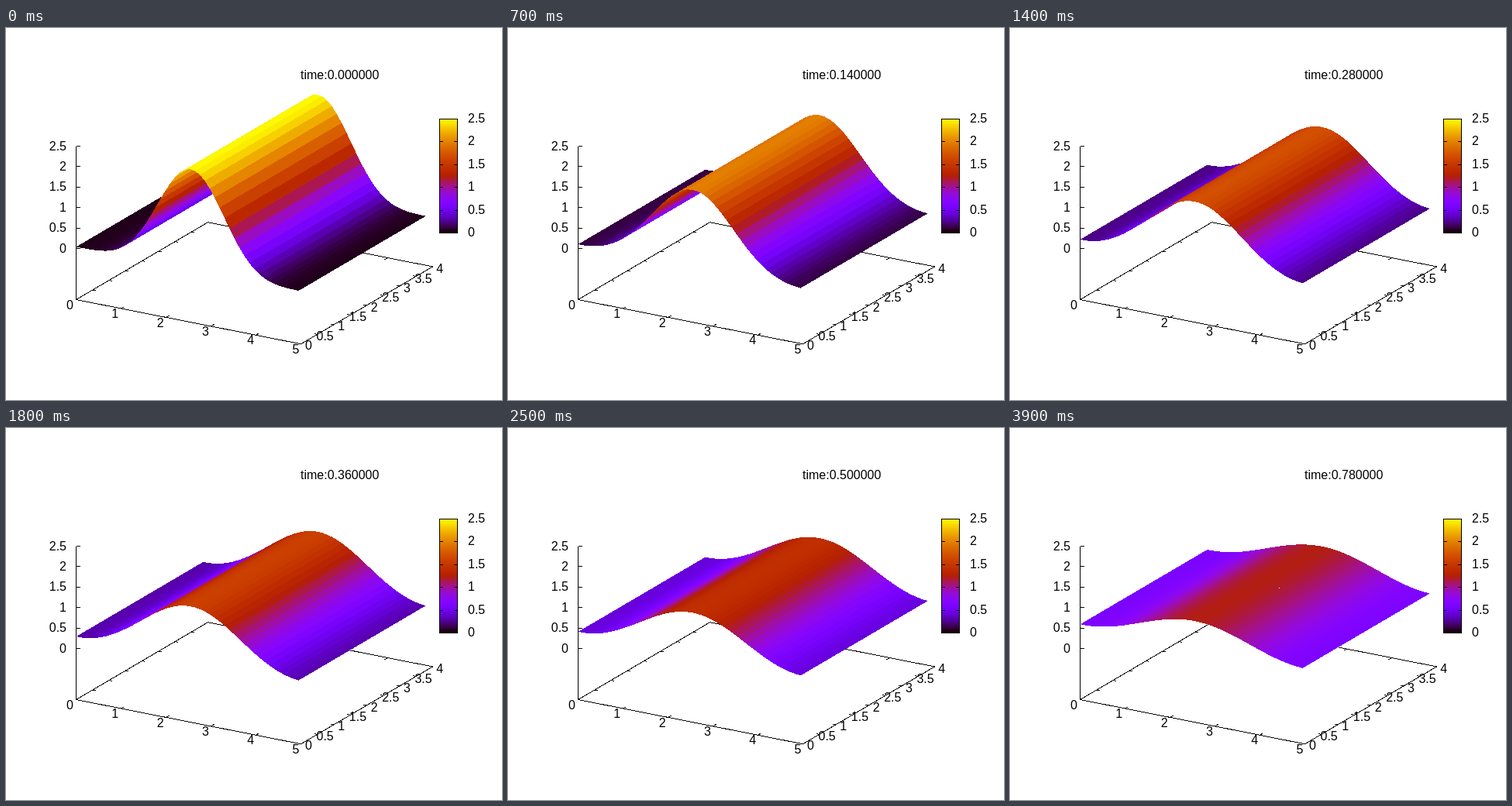
An HTML page for the animation above (4000 ms loop, 640x480 px).

```html
<!DOCTYPE html>
<html>
<head>
<meta charset="utf-8">
<title>Diffusing wave surface</title>
<style>
html, body { margin: 0; width: 100%; height: 100%; overflow: hidden; background: #fff; }
svg { display: block; }
text { font: 16px "Liberation Sans", Arial, sans-serif; fill: #000; }
line, path, rect, polygon { shape-rendering: crispEdges; }
line, path { stroke: #000; fill: none; }
</style>
</head>
<body>
<svg id="stage" width="640" height="480" viewBox="0 0 640 480">
  <g id="axes"></g>
  <g id="surface"></g>
  <g id="bar"></g>
  <text id="clock" x="380" y="66"></text>
</svg>
<script>
const NS = "http://www.w3.org/2000/svg";
const $ = id => document.getElementById(id);
const axes = $("axes"), surface = $("surface"), bar = $("bar"), clock = $("clock");

const STEP_MS = 100, STEPS = 40, DT = 0.02;
const DX = 0.11, STRIPS = 45, DEPTH = 3.86;
const Z_MAX = 2.5, Z_FLOOR = -1.25;

function add(parent, tag, attrs, text) {
  const el = document.createElementNS(NS, tag);
  for (const k in attrs) el.setAttribute(k, attrs[k]);
  if (text !== undefined) el.textContent = text;
  parent.appendChild(el);
  return el;
}

const line = (parent, x1, y1, x2, y2) => add(parent, "line", { x1, y1, x2, y2 });

const label = (parent, x, y, text, anchor) =>
  add(parent, "text", { x, y, "text-anchor": anchor }, text);

const project = (x, y, z) => [
  90.5 + 58 * x + 42.5 * y,
  284.5 + 11.45 * x - 24.95 * y - 52.8 * z
];

// Square root, cubic and sine ramps for the three channels
function color(z) {
  const v = Math.min(1, Math.max(0, z / Z_MAX));
  const rgb = [Math.sqrt(v), v ** 3, Math.max(0, Math.sin(2 * Math.PI * v))];
  return `rgb(${rgb.map(c => Math.round(255 * c))})`;
}

// Heat equation between insulated walls: each cosine mode decays on its own
const MODES = [0.905, 1.19, 0.36, 0.035];
function height(x, t) {
  const a = 2 * Math.PI / 5 * (x - 2.55);
  return MODES.reduce((sum, c, k) =>
    sum + c * Math.exp(-1.7 * k * k * t) * Math.cos(k * a), 0);
}

function drawAxes() {
  const floor = (x, y) => project(x, y, Z_FLOOR);
  const corners = [floor(0, 0), floor(5, 0), floor(5, 4), floor(0, 4)];
  add(axes, "path", { d: "M" + corners.join("L") + "Z" });
  line(axes, 90.5, 350.5, 90.5, 152.5);

  const tick = ([x, y], dx, dy) => line(axes, x, y, x + dx, y + dy);
  for (let i = 0; i <= 5; i++) {
    tick(floor(i, 0), 4, -2.4);
    tick(floor(i, 4), -4, 2.4);
    label(axes, 82.5 + 58.3 * i, 363 + 11.3 * i, i, "middle");

    const [zx, zy] = project(0, 0, i / 2);
    line(axes, zx, zy, zx + 5, zy);
    label(axes, 78, zy + 5, i / 2, "end");
  }
  for (let i = 0; i <= 8; i++) {
    tick(floor(0, i / 2), 4, 0.8);
    tick(floor(5, i / 2), -4, -0.8);
    label(axes, 390.5 + 21.15 * i, 415 - 12.35 * i, i / 2, "middle");
  }
}

function drawBar() {
  const left = 559, top = 117, w = 23, h = 147;
  for (let i = 0; i < h; i++) {
    add(bar, "rect", {
      x: left, y: top + i, width: w, height: 1,
      fill: color(Z_MAX * (1 - i / (h - 1)))
    });
  }
  add(bar, "path", { d: `M${left + 0.5} ${top + 0.5}h${w}v${h}h${-w}z` });
  for (let i = 0; i <= 5; i++) {
    const y = Math.round(top + h - h * i / 5) + 0.5;
    line(bar, left, y, left + 5, y);
    line(bar, left + w - 4, y, left + w + 1, y);
    label(bar, 596, y + 4.5, i / 2, "start");
  }
}

// Strips run from far to near, so later ones hide earlier ones
const strips = Array.from({ length: STRIPS }, () => add(surface, "polygon", {}));

function render(t) {
  strips.forEach((strip, i) => {
    const x0 = i * DX, x1 = x0 + DX;
    const z0 = height(x0, t), z1 = height(x1, t);
    const points = [
      project(x0, 0, z0), project(x1, 0, z1),
      project(x1, DEPTH, z1), project(x0, DEPTH, z0)
    ];
    strip.setAttribute("points", points.join(" "));
    strip.setAttribute("fill", color((z0 + z1) / 2));
  });
  clock.textContent = "time:" + t.toFixed(6);
}

let start, shown = -1;
function frame(now) {
  if (start === undefined) start = now;
  const step = Math.floor(Math.max(0, now - start) / STEP_MS) % STEPS;
  if (step !== shown) render(DT * (shown = step));
  requestAnimationFrame(frame);
}

drawAxes();
drawBar();
render(0);
requestAnimationFrame(frame);
</script>
</body>
</html>
```
